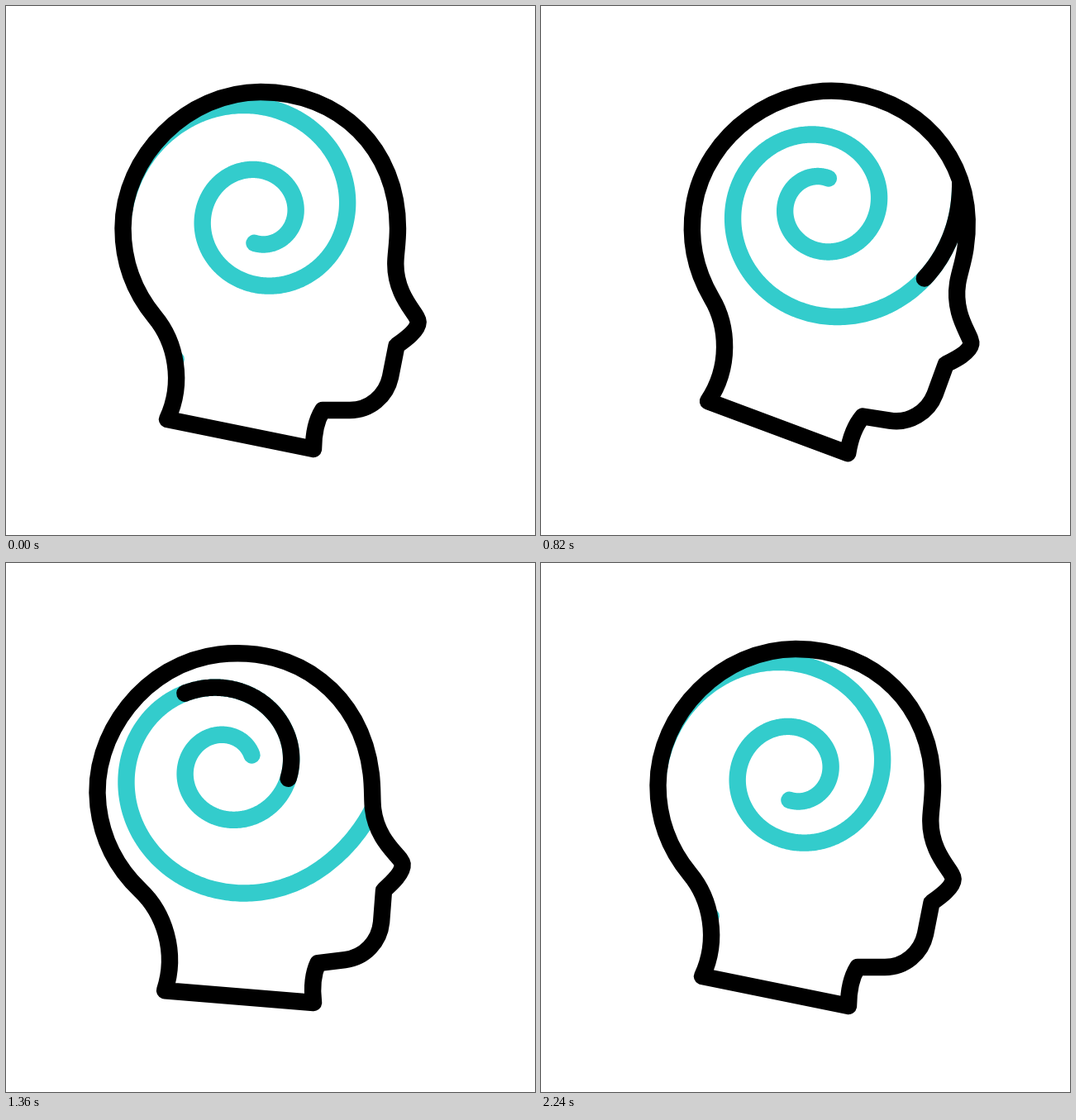
An HTML page with a canvas for the animation above (2400 ms loop, 640 by 640 pixels).

```html
<!DOCTYPE html>
<html lang="en">
<head>
<meta charset="utf-8">
<title>Spinning thoughts</title>
<style>
  html, body { margin: 0; width: 100%; height: 100%; overflow: hidden; background: #fff; }
  canvas { display: block; width: 640px; height: 640px; }
</style>
</head>
<body>
<canvas id="stage" width="640" height="640"></canvas>
<script>
const ctx = document.getElementById('stage').getContext('2d');
const LOOP = 2400, LINE = 20.4, TEAL = '#33cccc', INK = '#000';
const RAD = Math.PI / 180;

const head = new Path2D(`
  M141.5 269 C141.5 312 157 348 180 376
  C205 406 216 455 195 500
  L372 536 C372 517 375 502 383 489
  L416 489 C440 489 460 472 465 449
  L472.5 411 C481 405 498.5 393 498.7 382
  C498.7 373 471.3 352 471.3 312
  C471.3 300 474 288 474 269
  C474 173 404 104 308 104
  C220 104 141.5 181 141.5 269 Z`);
const neck = { x: 338.3, y: 533.5 };

// Logarithmic spiral, slightly off its turning point, flaring at the tail.
const hub = { x: 300.6, y: 248.8 };
const SPIN = 257.5;
const spiral = [];
for (let a = 0; a <= 700; a++) {
  const flare = 1 + 0.04 * Math.max(0, (a - 645) / 45) ** 2;
  const r = 34.3 * Math.exp(0.1402 * a * RAD) * flare;
  const dir = (100 - a) * RAD;
  const p = { x: 5.8 + r * Math.cos(dir), y: 4.2 + r * Math.sin(dir), d: 0 };
  const q = spiral[a - 1];
  if (q) p.d = q.d + Math.hypot(p.x - q.x, p.y - q.y);
  spiral.push(p);
}
const total = spiral[spiral.length - 1].d;

function ease(t, start, end) {
  const u = Math.min(1, Math.max(0, (t - start) / (end - start)));
  return u * u * (3 - 2 * u);
}

// Keys are [time, value] pairs with eased steps between them.
function track(t, keys) {
  let v = keys[0][1];
  for (let i = 1; i < keys.length; i++) {
    v += (keys[i][1] - keys[i - 1][1]) * ease(t, keys[i - 1][0], keys[i][0]);
  }
  return v;
}

function pointAt(d) {
  let i = 1;
  while (i < spiral.length - 1 && spiral[i].d < d) i++;
  const p = spiral[i - 1], q = spiral[i];
  const k = (d - p.d) / (q.d - p.d);
  return { x: p.x + (q.x - p.x) * k, y: p.y + (q.y - p.y) * k };
}

function strokeSpiral(from, to, color) {
  if (to - from < 1e-5) return;
  const a = from * total, b = to * total;
  const pts = [pointAt(a), ...spiral.filter(p => p.d > a && p.d < b), pointAt(b)];
  ctx.beginPath();
  for (const p of pts) ctx.lineTo(p.x, p.y);
  ctx.strokeStyle = color;
  ctx.stroke();
}

function draw(t) {
  const tilt = track(t, [[200, 0], [800, 9], [1400, -7], [1800, 6], [2200, 0]]);
  const spin = track(t, [[200, 0], [1200, SPIN], [2200, 0]]);

  ctx.setTransform(1, 0, 0, 1, 0, 0);
  ctx.fillStyle = '#fff';
  ctx.fillRect(0, 0, 640, 640);
  ctx.lineWidth = LINE;
  ctx.lineCap = ctx.lineJoin = 'round';

  ctx.translate(neck.x, neck.y);
  ctx.rotate(tilt * RAD);
  ctx.translate(-neck.x, -neck.y);

  ctx.save();
  ctx.clip(head);
  ctx.translate(hub.x, hub.y);
  ctx.rotate(spin * RAD);
  strokeSpiral(0, 1, TEAL);
  strokeSpiral(1 - ease(t, 300, 1900), 1 - ease(t, 500, 2100), INK);
  ctx.restore();

  ctx.strokeStyle = INK;
  ctx.stroke(head);
}

function tick(now) {
  draw(now % LOOP);
  requestAnimationFrame(tick);
}
draw(0);
requestAnimationFrame(tick);
</script>
</body>
</html>
```
